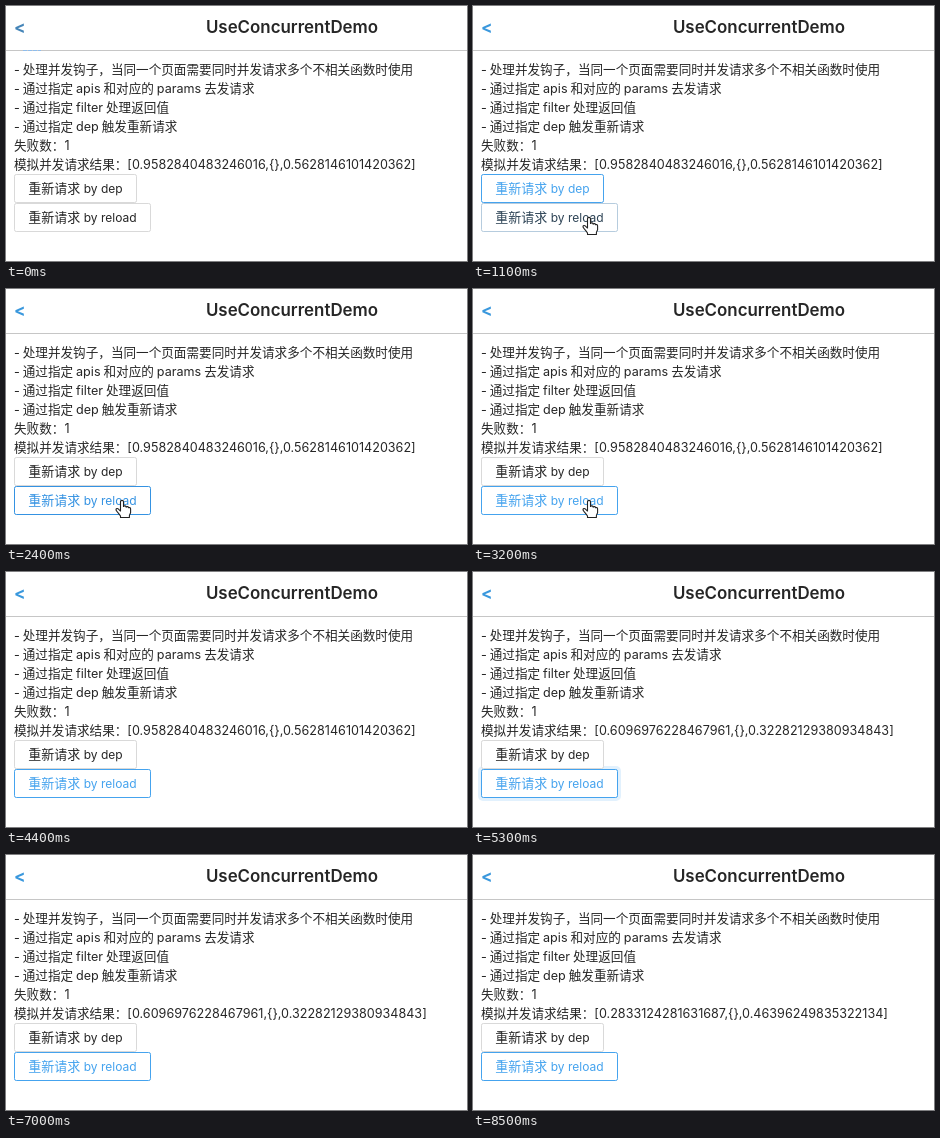
An HTML page for the animation above (10000 ms loop, 461 by 255 pixels).

```html
<!DOCTYPE html>
<html lang="zh-CN">
<head>
<meta charset="utf-8">
<title>UseConcurrentDemo</title>
<style>
html, body { margin: 0; width: 100%; height: 100%; overflow: hidden; background: #fff; }
svg { display: block; width: 461px; height: 255px; font: 12.6px Inter, "Noto Sans CJK SC", "Noto Sans CJK", sans-serif; fill: #262626; }
.line { word-spacing: -.6px; }
.title { font-size: 16.9px; font-weight: 600; text-anchor: middle; }
.back { font-size: 17px; font-weight: 700; }
.box { fill: #fff; }
.label { font-size: 13px; }
.label tspan { font-size: 12px; }
</style>
</head>
<body>
<svg viewBox="0 0 461 255" xml:space="preserve">
  <text class="back" id="back" x="8" y="27">&lt;</text>
  <text class="title" x="286" y="27">UseConcurrentDemo</text>
  <path d="M0 44.5H461" stroke="#c6c6c6"/>
  <path id="hint" d="M17 44.5H35" stroke="#8fbdec" stroke-dasharray="4 1"/>
  <g id="lines"></g>
  <rect id="wave" fill="#40a0f0"/>
  <g id="buttons"></g>
  <path id="hand" fill="#fff" stroke="#222" stroke-width="1.1" stroke-linejoin="round"
    d="M-1.5 1.2C-1.5-.6 1.5-.6 1.5 1.2V6c.3-1 2.6-.8 2.6.6c.5-.8 2.4-.6 2.5.7c.6-.6 2-.2 2 1V12c0 1-1 2-1.2 3.2V17H-1.5V15.5C-3 13-5 11.5-6 9.5C-6.3 8-4.5 7.5-3.3 8.8L-1.5 10.5Z"/>
</svg>
<script>
const LOOP = 10000, CLICKS = [1600, 5100];
const GREY = [217, 217, 217], INK = [38, 38, 38], HOVER = [69, 163, 238], ACTIVE = [26, 120, 208];
const RESULTS = [
  [0, '[0.9582840483246016,{},0.5628146101420362]'],
  [4700, '[0.6096976228467961,{},0.32282129380934843]'],
  [8500, '[0.2833124281631687,{},0.46396249835322134]']
];
// time, x, y of the fingertip
const PATH = [[400, 226, 216], [600, 170, 200], [800, 118, 183], [1000, 116, 196], [1100, 116, 204]];

const $ = id => document.getElementById(id);
const ramp = (t, a, b) => Math.min(1, Math.max(0, (t - a) / (b - a)));
const mix = (a, b, k) => a.map((v, i) => v + (b[i] - v) * k);
const css = c => `rgb(${c.map(Math.round)})`;
const set = (el, attrs) => { for (const k in attrs) el.setAttribute(k, attrs[k]); };

$('lines').innerHTML = [
  '- 处理并发钩子，当同一个页面需要同时并发请求多个不相关函数时使用',
  '- 通过指定 apis 和对应的 params 去发请求',
  '- 通过指定 filter 处理返回值',
  '- 通过指定 dep 触发重新请求',
  '失败数：1',
  ''
].map((s, i) => `<text class="line" x="8" y="${68 + 19 * i}">${s}</text>`).join('');
const result = $('lines').lastChild;

$('buttons').innerHTML = [['dep', 122, 168.5], ['reload', 136, 197.5]].map(([name, w, y]) =>
  `<g><rect class="box" x="8.5" y="${y}" width="${w}" height="28" rx="1.8"/>` +
  `<text class="label" x="22.3" y="${y + 18.5}">重新请求<tspan> by ${name}</tspan></text></g>`).join('');
const [dep, reload] = $('buttons').children;

function paint(button, hover, press) {
  const tone = from => css(mix(mix(from, HOVER, hover), ACTIVE, press));
  set(button.firstChild, { stroke: tone(GREY) });
  set(button.lastChild, { fill: tone(INK) });
}

function pointer(t) {
  const i = PATH.findIndex(p => p[0] > t);
  if (i < 0) return PATH[PATH.length - 1].slice(1);
  const a = PATH[i - 1] || PATH[0], b = PATH[i];
  return mix(a, b, ramp(t, a[0], b[0])).slice(1);
}

function draw(t) {
  const idle = t < 400;
  set($('back'), { fill: idle ? '#4585b8' : '#3a98dd' });
  set($('hint'), { visibility: idle ? 'visible' : 'hidden' });
  result.textContent = '模拟并发请求结果：' + RESULTS.filter(r => r[0] <= t).pop()[1];

  paint(dep, ramp(t, 700, 1000) - ramp(t, 1100, 1400), 0);
  paint(reload, ramp(t, 1030, 1330), .8 * (ramp(t, 1500, 1700) - ramp(t, 2200, 2600)));

  // ring that spreads around the button and fades after a click
  const age = t - (CLICKS.filter(c => c <= t).pop() ?? -LOOP);
  const s = 4 * (1 - (1 - ramp(age, 0, 400)) ** 2);
  set($('wave'), {
    x: 8 - s, y: 197 - s, width: 137 + 2 * s, height: 29 + 2 * s, rx: 2 + s,
    opacity: .3 * (1 - ramp(age, 0, 1000)) ** 3
  });

  set($('hand'), {
    visibility: t >= 400 && t < 4400 ? 'visible' : 'hidden',
    transform: `translate(${pointer(t)}) translate(0 7.5)`
  });
}

const start = performance.now();
(function frame() {
  const t = (performance.now() - start) % LOOP;
  draw(Math.floor(t / 100) * 100);
  requestAnimationFrame(frame);
})();
</script>
</body>
</html>
```
